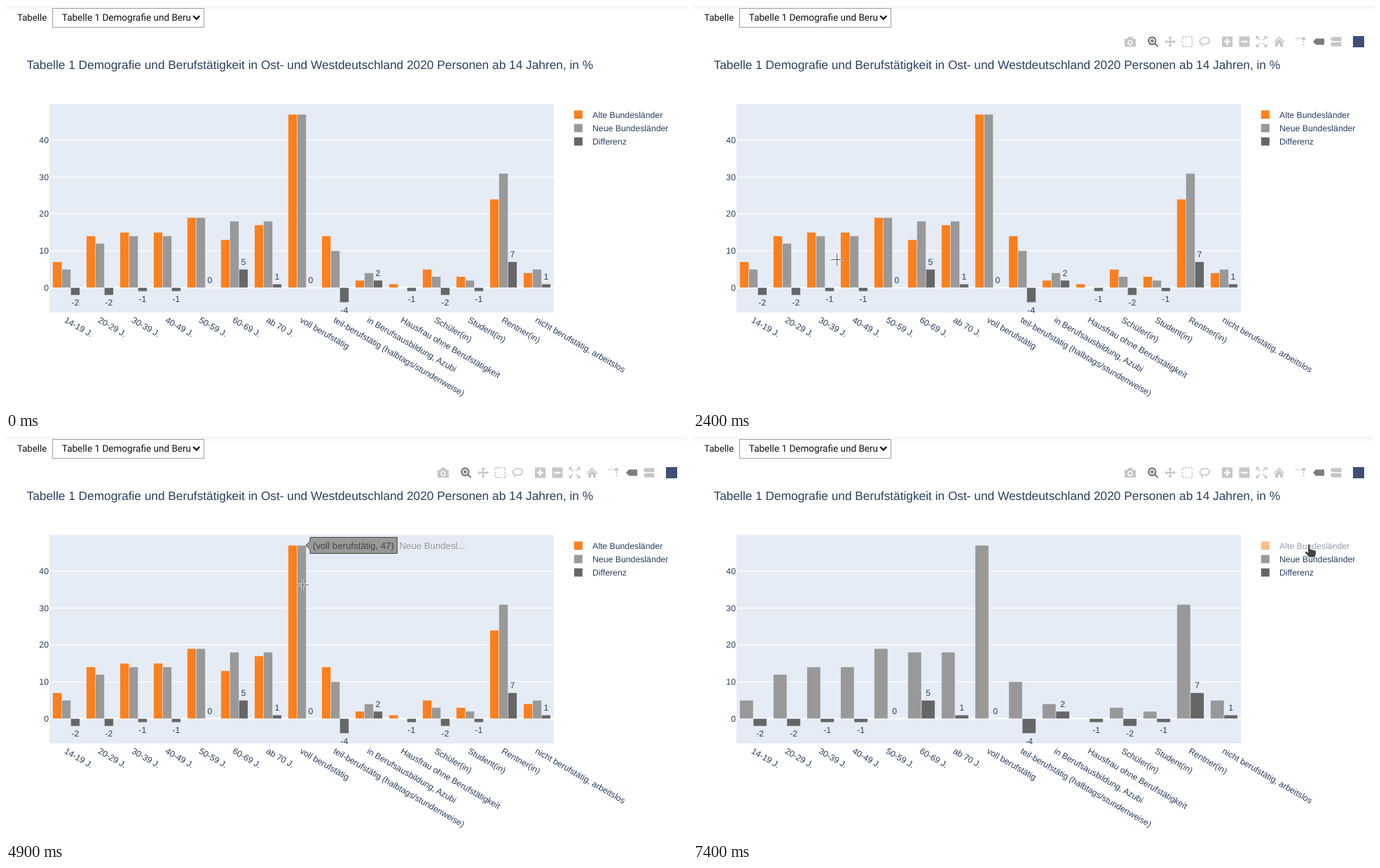
Animation of 972x576 px, one loop 8 s. Source, as an HTML page:

```html
<!DOCTYPE html>
<html lang="de">
<head>
<meta charset="utf-8">
<style>
  html, body { margin: 0; width: 100%; height: 100%; overflow: hidden; background: #fff; }
  svg { display: block; width: 972px; height: 576px; }
  text { font: 12.28px "Liberation Sans", Arial, sans-serif; fill: #2a3f5f; text-rendering: geometricPrecision; white-space: pre; }
  .title { font-size: 17.29px; }
  .hover { font-size: 13.2px; fill: #444; }
  .form { font: 13.2px Roboto, sans-serif; fill: #111; }
  .choice { font-size: 13.55px; }
</style>
</head>
<body>
<svg id="stage" viewBox="0 0 972 576"></svg>
<script>
const LOOP = 8000, STEP = 100;
const MODEBAR_AT = 1000, TOGGLE_AT = 7400;
const plot = { left: 62, right: 782, top: 140, bottom: 438, zero: 402.6, unit: 5.27, slot: 48 };
const barOutline = 'stroke="#e5ecf6" stroke-width=".5"';

const categories = ['14-19 J.', '20-29 J.', '30-39 J.', '40-49 J.', '50-59 J.', '60-69 J.', 'ab 70 J.',
  'voll berufstätig', 'teil-berufstätig (halbtags/stundenweise)', 'in Berufsausbildung, Azubi',
  'Hausfrau ohne Berufstätigkeit', 'Schüler(in)', 'Student(in)', 'Rentner(in)', 'nicht berufstätig, arbeitslos'];
const west = [7, 14, 15, 15, 19, 13, 17, 47, 14, 2, 1, 5, 3, 24, 4];
const east = [5, 12, 14, 14, 19, 18, 18, 47, 10, 4, 0, 3, 2, 31, 5];
const series = [
  { name: 'Alte Bundesländer', color: '#fe7f1b', values: west },
  { name: 'Neue Bundesländer', color: '#999', values: east },
  { name: 'Differenz', color: '#666', values: east.map((v, i) => v - west[i]), labelled: true }
];

// Pointer path: time, x, y
const pointerPath = [
  [1000, 4, 384], [1200, 50, 375], [1500, 126, 366], [2100, 126, 366], [2200, 135, 365], [2300, 157, 364],
  [2400, 205, 362], [2500, 205, 362], [2600, 212, 361], [2800, 212, 361], [2900, 218, 358], [3000, 224, 355],
  [3900, 224, 355], [4000, 254, 340], [4100, 320, 296], [4200, 422, 224], [4300, 448, 211], [4400, 448, 211],
  [4900, 423, 211], [5400, 423, 211], [5500, 441, 207], [5600, 500, 191], [5700, 590, 165], [5800, 685, 141],
  [5900, 745, 136], [6000, 795, 135], [6300, 881, 142], [6600, 881, 156], [6700, 881, 156], [6800, 880, 154]
];

// Toolbar icons, centred on their own origin
const icons = [
  { x: 624, fill: 'M-8-4h4l1-3h6l1 3h4v11h-16zM0-2.5a3.8 3.8 0 1 0 .01 0zM0-1a2.3 2.3 0 1 0 .01 0z' },
  { x: 656.5, line: 'M-1.2-6.3a5.1 5.1 0 1 0 .01 0zM3 3L7 7M-1.2-3.7v5M-3.7-1.2h5', width: 2.3, active: true },
  { x: 681, fill: 'M0-8l3 3.4h-2v3.6h3.6v-2L8 0l-3.4 3v-2H1v3.6h2L0 8l-3-3.4h2V1h-3.6v2L-8 0l3.4-3v2H-1v-3.6h-2z' },
  { x: 705.5, line: 'M-7-7h14v14h-14z', width: 2, dash: '2 2' },
  { x: 730, line: 'M-3 3.5C-9 1-7-6 1-6S9 2 2 3.5C-1 4-3 2-4 3.5S-2 6-4 7', width: 1.7 },
  { x: 762.5, fill: 'M-7.5-7.5h15v15h-15zM-1.2-4.5h2.4v3.3h3.3v2.4h-3.3v3.3h-2.4v-3.3h-3.3v-2.4h3.3z' },
  { x: 787, fill: 'M-7.5-7.5h15v15h-15zM-4.5-1.2h9v2.4h-9z' },
  { x: 811.5, fill: 'M-8-8h5l-5 5zM8-8v5l-5-5zM8 8h-5l5-5zM-8 8v-5l5 5z', line: 'M-6-6L-2-2M6-6L2-2M6 6L2 2M-6 6L-2 2', width: 1.5 },
  { x: 836.5, fill: 'M0-7.5L8 .5 7 1.5 0-5-7 1.5-8 .5zM0-3.8L5.5 1.5V7H1.5V3h-3V7h-4V1.5z' },
  { x: 867, line: 'M-7-4.5h9M4.5-1v8', width: 2, dash: '2 2', fill: 'M4.5-7a2.5 2.5 0 1 0 .01 0z' },
  { x: 893, fill: 'M-8 0l4-4.5h12v9h-12z', active: true },
  { x: 917.5, fill: 'M-8-3.7l2.5-3h13.5v6h-13.5zM-8 3.7l2.5-3h13.5v6h-13.5z' }
];

const rect = (x, y, w, h, fill, extra = '') =>
  `<rect x="${x}" y="${y}" width="${w}" height="${h}" fill="${fill}" ${extra}/>`;
const path = (d, extra) => `<path d="${d}" ${extra}/>`;
const text = (x, y, s, extra = '') => `<text x="${x}" y="${y}" ${extra}>${s}</text>`;
const yOf = value => plot.zero - value * plot.unit;
const slotX = i => plot.left + i * plot.slot;

const ruler = document.createElement('canvas').getContext('2d');
ruler.textRendering = 'geometricPrecision';
ruler.font = '13.2px "Liberation Sans", Arial, sans-serif';
const hoverWidth = s => ruler.measureText(s).width;

function pointerAt(t) {
  if (t < pointerPath[0][0]) return null;
  const next = pointerPath.findIndex(p => p[0] > t);
  if (next < 0) return pointerPath.at(-1).slice(1);
  const [t0, x0, y0] = pointerPath[next - 1], [t1, x1, y1] = pointerPath[next];
  const k = (t - t0) / (t1 - t0);
  return [Math.round(x0 + (x1 - x0) * k), Math.round(y0 + (y1 - y0) * k)];
}

function layoutBars(shown) {
  const width = plot.slot * 0.8 / shown.length;
  return shown.flatMap((s, k) => s.values.map((value, i) => ({
    s, value, width, category: categories[i],
    x: slotX(i) + plot.slot * 0.1 + k * width,
    top: Math.min(yOf(value), plot.zero), height: Math.abs(value) * plot.unit
  })));
}

function header() {
  return '<defs><linearGradient id="shade" x2="0" y2="1"><stop stop-color="#f3f3f3"/><stop offset="1" stop-color="#fff"/></linearGradient></defs>'
    + rect(0, 0, 972, 7, 'url(#shade)')
    + text(16, 21, 'Tabelle', 'class="form"')
    + rect(66.5, 3.5, 216, 27, '#fff', 'stroke="#9e9e9e"')
    + text(79.8, 21, 'Tabelle 1 Demografie und Beru', 'class="form choice"')
    + path('M267.2 14l4.6 4.6 4.6-4.6', 'fill="none" stroke="#111" stroke-width="2.2"')
    + text(29.6, 89.6, 'Tabelle 1 Demografie und Berufstätigkeit in Ost- und Westdeutschland 2020 Personen ab 14 Jahren, in %', 'class="title"');
}

function modebar(opacity) {
  const draw = icon => {
    const color = icon.active ? '#7c7c7c' : '#c7c7c7';
    return `<g transform="translate(${icon.x} 51)">`
      + (icon.fill ? path(icon.fill, `fill="${color}" fill-rule="evenodd"`) : '')
      + (icon.line ? path(icon.line, `fill="none" stroke="${color}" stroke-width="${icon.width}" stroke-dasharray="${icon.dash || 'none'}"`) : '')
      + '</g>';
  };
  return `<g opacity="${opacity}">${icons.map(draw).join('')}${rect(942, 43, 16, 16, '#3f4f75')}</g>`;
}

function chart(bars) {
  const width = plot.right - plot.left;
  let out = rect(plot.left, plot.top, width, plot.bottom - plot.top, '#e5ecf6');
  for (let v = 0; v <= 40; v += 10) {
    const thick = v ? 1.2 : 2;
    out += rect(plot.left, yOf(v) - thick / 2, width, thick, '#fff')
      + text(61, yOf(v) + 4.2, v, 'text-anchor="end"');
  }
  for (const b of bars) {
    if (b.value) out += rect(b.x, b.top, b.width, b.height, b.s.color, barOutline);
  }
  for (const b of bars.filter(b => b.s.labelled)) {
    const y = yOf(b.value) + (b.value < 0 ? 15.3 : -6.3);
    out += text(b.x + b.width / 2, y, b.value, 'text-anchor="middle"');
  }
  categories.forEach((name, i) => {
    out += text(0, 0, name, `transform="translate(${slotX(i) + 20.4} 451.3) rotate(30)"`);
  });
  return out;
}

function legend(hidden) {
  return series.map((s, i) => {
    const y = 155.2 + i * 19.25;
    return `<g opacity="${s === hidden ? 0.5 : 1}">${rect(810.8, y - 6.1, 12.2, 12.2, s.color, barOutline)}${text(837, y + 4.4, s.name)}</g>`;
  }).join('');
}

function hoverLabel(bar) {
  const label = `(${bar.category}, ${bar.value})`;
  const name = bar.s.name.length > 15 ? bar.s.name.slice(0, 12) + '...' : bar.s.name;
  const w = hoverWidth(label) + 8.5, h = 23;
  return `<g transform="translate(${bar.x + bar.width - 0.4} ${yOf(bar.value)})">`
    + rect(6 + w, -h / 2, hoverWidth(name) + 9, h, '#e5ecf6', 'fill-opacity=".8"')
    + path(`M0 0L6 6v${h / 2 - 6}h${w}v${-h}H6V-6z`, `fill="${bar.s.color}" stroke="#444"`)
    + text(10, 4.6, label, 'class="hover"')
    + text(9.3 + w, 4.6, name, `class="hover" style="fill:${bar.s.color}"`)
    + '</g>';
}

function pointer(x, y) {
  const inPlot = x > plot.left && x < plot.right && y >= plot.top && y < plot.bottom;
  const solid = 'fill="#444" stroke="#fff" stroke-width=".8" stroke-linejoin="round"';
  let shape;
  if (inPlot) {
    const cross = 'M-8 .5h17M.5-8v17';
    shape = path(cross, 'stroke="#fff" stroke-width="2.4"') + path(cross, 'stroke="#555"');
  } else if (x > 796 && y > 140) {
    shape = path('M-2.7 0Q-1-2 .8 0V6L8 8Q10 9 9.5 11.5L8 18H-1L-6.5 11.5Q-7.5 8.5-4.5 9.5L-2.2 11z', solid);
  } else {
    shape = path('M0 0v16l4-3.5 2.5 5.5 2.5-1-2.5-5.5h5.5z', solid);
  }
  return `<g transform="translate(${x} ${y})">${shape}</g>`;
}

const stage = document.getElementById('stage');

function render(t) {
  const hidden = t >= TOGGLE_AT ? series[0] : null;
  const bars = layoutBars(series.filter(s => s !== hidden));
  const at = pointerAt(t);
  const hovered = at && bars.find(b =>
    at[0] >= b.x && at[0] < b.x + b.width && at[1] >= b.top && at[1] <= b.top + b.height);
  const fade = Math.max(0, Math.min(1, (t - MODEBAR_AT + STEP) / 300));
  stage.innerHTML = header() + modebar(fade) + chart(bars) + legend(hidden)
    + (hovered ? hoverLabel(hovered) : '') + (at ? pointer(...at) : '');
}

let shownStep = -1;
const start = performance.now();
function tick() {
  const step = Math.floor((performance.now() - start) % LOOP / STEP);
  if (step !== shownStep) render((shownStep = step) * STEP);
  requestAnimationFrame(tick);
}
tick();
</script>
</body>
</html>
```
